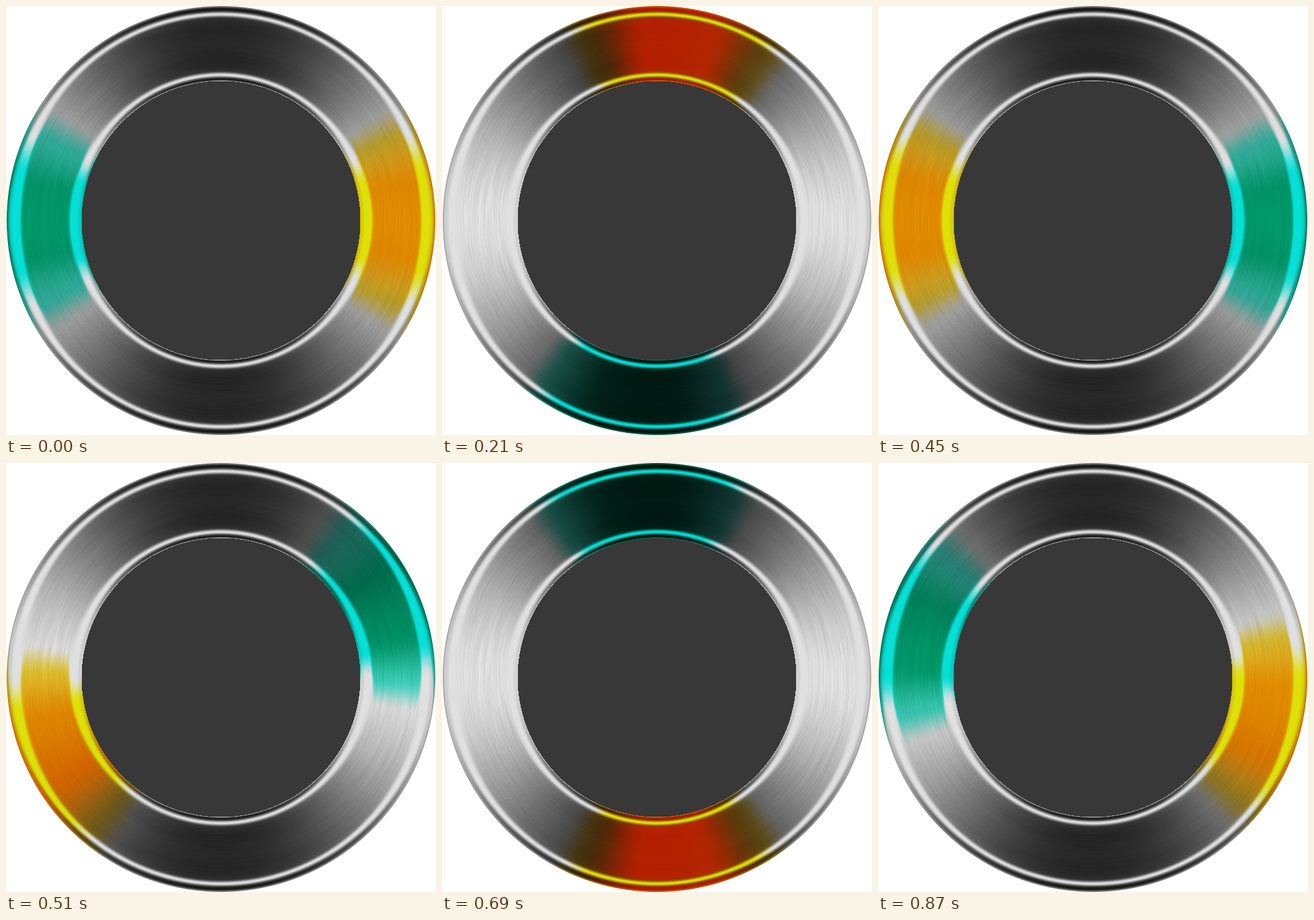
An HTML page with a canvas for the animation above (900 ms loop, 651 by 649 pixels).

```html
<!DOCTYPE html>
<html lang="en">
<head>
<meta charset="utf-8">
<title>Metal ring</title>
<style>
  html, body { margin: 0; width: 100%; height: 100%; overflow: hidden; background: #fff; }
  canvas { display: block; }
</style>
</head>
<body>
<canvas id="ring" width="651" height="649"></canvas>
<script>
const W = 651, H = 649, CX = 325.5, CY = 324.5;
const R_IN = 211, R_OUT = 324.4;
const LOOP = 900, STEP = 30, TURN = 11.95;
const ctx = document.getElementById('ring').getContext('2d');
const image = ctx.createImageData(W, H);
const px = image.data;

const clamp = v => v < 0 ? 0 : v > 1 ? 1 : v;
const mix = (a, b, t) => a + (b - a) * t;
const smooth = (a, b, v) => {
  const t = clamp((v - a) / (b - a));
  return t * t * (3 - 2 * t);
};
const bell = (d, s) => Math.exp(-d * d / (s * s));

// Seeded noise, long along the circle and fine across it
const CELLS = 40, ROWS = 120;
let seed = 7;
const random = () => (seed = (seed * 16807) % 2147483647) / 2147483647;
const grain = Float32Array.from({ length: CELLS * ROWS }, () => random() * 2 - 1);

function streak(r, deg) {
  const row = Math.floor(r - R_IN) * CELLS;
  const u = (deg + 180) / 360 * CELLS;
  const i = Math.floor(u);
  return mix(grain[row + i % CELLS], grain[row + (i + 1) % CELLS], u - i);
}

// Brushed metal with two polished rims: grey level, rim strength, side light
function metal(r, deg) {
  const side = Math.pow(Math.abs(Math.cos(deg * Math.PI / 180)), 2.4);
  const flare = side * side;
  const d = Math.min(Math.abs(r - 312), Math.abs(r - 220.3));
  const rim = Math.exp(-Math.pow(d / (3.8 + 5.2 * flare), 2 + 2 * flare));
  const glow = 0.16 * Math.exp(-d / 8);
  const line = Math.max(bell(r - 319, 3), bell(r - 214.5, 2.5));
  let g = 32 + 189 * side + 7 * bell(r - 268, 22) * (1 - side);
  g *= 1 + streak(r, deg) * 0.05 * (1 - rim);
  g = mix(g, 224, Math.max(rim, glow * (1 - line)));
  g *= 1 - line * mix(0.35, 0.12, side) * (1 - rim * 0.5);
  g = mix(g, 150, smooth(320.5, 324.5, r) * 0.85);
  g = mix(g, 205, smooth(212.8, 211, r) * 0.8);
  return { g, side, rim: Math.min(1, rim * 1.5) };
}

const ring = [];
for (let y = 0; y < H; y++) {
  for (let x = 0; x < W; x++) {
    const dx = x + 0.5 - CX, dy = y + 0.5 - CY;
    const r = Math.hypot(dx, dy), i = (y * W + x) * 4;
    px[i] = px[i + 1] = px[i + 2] = r < R_IN ? 56 : 255;
    px[i + 3] = 255;
    if (r >= R_IN && r < R_OUT + 0.5) {
      const deg = Math.atan2(-dy, dx) * 180 / Math.PI;
      const cover = clamp(R_OUT + 0.5 - r);
      const m = metal(r, deg);
      const half = 33 - 3 * m.side - m.rim * (4 + 7 * m.side);
      ring.push({ i, deg, cover, half, g: m.g, rim: m.rim });
    }
  }
}

function paint(turn) {
  for (const p of ring) {
    const { g, rim, half, cover } = p;
    let off = Math.abs(p.deg - turn) % 360;
    if (off > 180) off = 360 - off;
    const warm = off < 90;
    if (!warm) off = 180 - off;

    const tint = 1 - smooth(half - 6, half + 4, off);
    let red = g, green = g, blue = g;
    if (tint > 0) {
      const core = 1 - smooth(9, 28, off);
      if (warm) {
        red = mix(mix(g * 0.9 + 18, 168 + g * 0.25, core), g * 0.75 + 56, rim);
        green = mix(mix(g * 0.86, g * 0.58 + 10, core), g, rim);
        blue = mix(mix(g * 0.22, 0, core), g * 0.04, rim);
      } else {
        red = mix(mix(g * 0.28, 0, core), g * 0.03, rim);
        green = mix(mix(g * 0.93, g * 0.68, core), g, rim);
        blue = mix(mix(g * 0.84, g * 0.47, core), g * 0.96, rim);
      }
      red = mix(g, red, tint);
      green = mix(g, green, tint);
      blue = mix(g, blue, tint);
    }
    px[p.i] = mix(255, red, cover);
    px[p.i + 1] = mix(255, green, cover);
    px[p.i + 2] = mix(255, blue, cover);
  }
  ctx.putImageData(image, 0, 0);
}

let shown = -1;
const start = performance.now();
function tick() {
  const t = Math.max(0, performance.now() - start) % LOOP;
  const step = Math.floor(t / STEP);
  if (step !== shown) {
    shown = step;
    paint(step * TURN);
  }
  requestAnimationFrame(tick);
}
tick();
</script>
</body>
</html>
```
